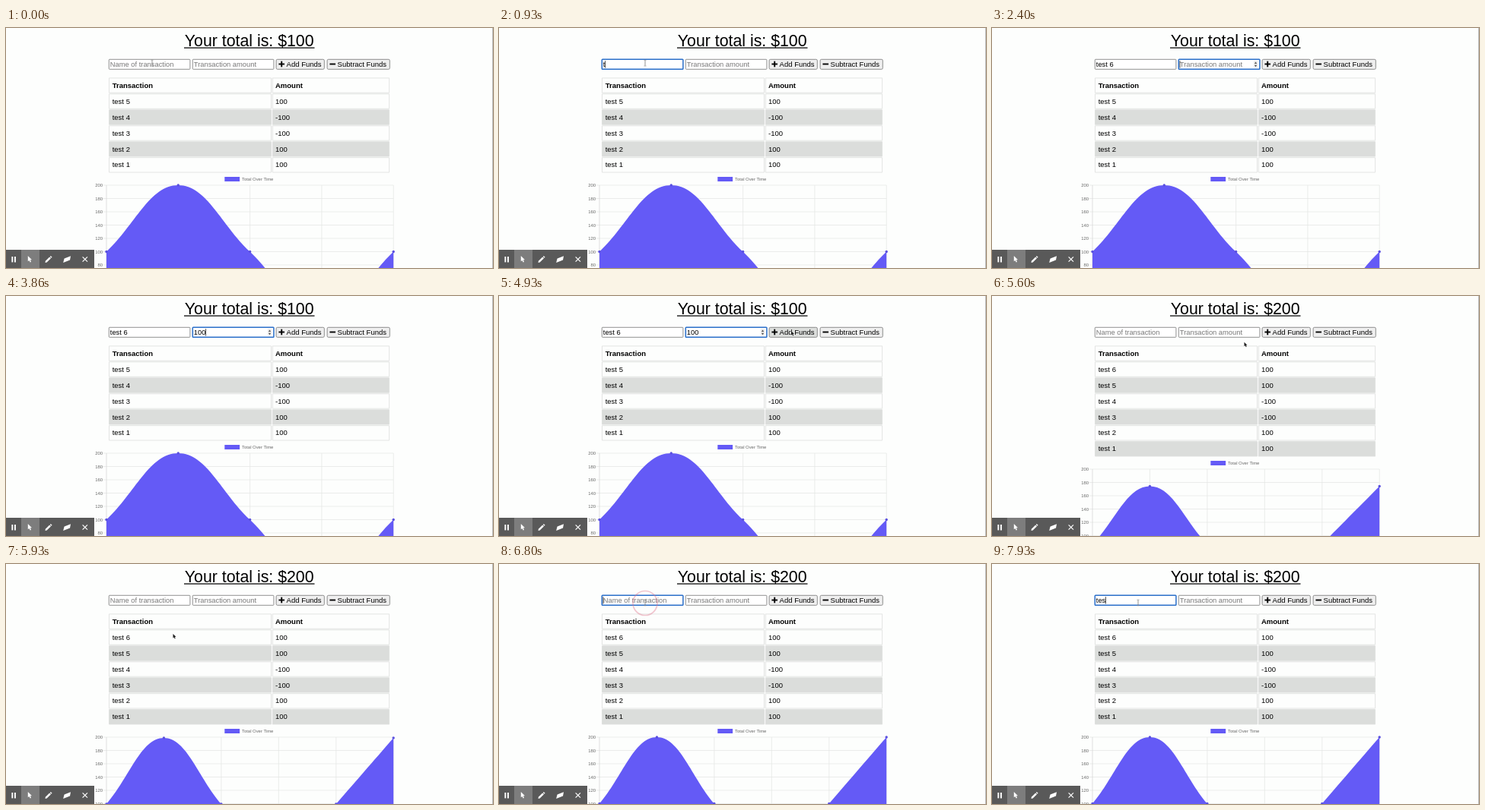
An HTML page with a canvas that plays this animation: 640x316 px, repeating every 8 s.

```html
<!DOCTYPE html>
<html lang="en">
<head>
<meta charset="utf-8">
<title>Budget tracker</title>
<style>
  html, body { margin: 0; width: 100%; height: 100%; overflow: hidden; background: #fdfefd; }
  canvas { display: block; width: 640px; height: 316px; }
</style>
</head>
<body>
<canvas id="stage"></canvas>
<script>
const LOOP = 8000;
const ADDED = 5200;
const CLEARED = 5330;
const FONT = '"Liberation Sans", Arial, sans-serif';
const PURPLE = '#645af6';

const canvas = document.getElementById('stage');
const dpr = window.devicePixelRatio || 1;
canvas.width = 640 * dpr;
canvas.height = 316 * dpr;
const ctx = canvas.getContext('2d');

const clamp = v => Math.max(0, Math.min(1, v));
const ease = p => p * p * (3 - 2 * p);

function text(str, x, y, size, color = '#000', align = 'left', weight = '') {
  ctx.font = `${weight} ${size}px ${FONT}`;
  ctx.fillStyle = color;
  ctx.textAlign = align;
  ctx.fillText(str, x, y);
}

function box(x, y, w, h, fill, stroke, line = 1, radius = 0) {
  ctx.beginPath();
  ctx.roundRect(x, y, w, h, radius);
  if (fill) { ctx.fillStyle = fill; ctx.fill(); }
  if (stroke) { ctx.strokeStyle = stroke; ctx.lineWidth = line; ctx.stroke(); }
}

function poly(points, fill) {
  ctx.beginPath();
  points.forEach(([x, y]) => ctx.lineTo(x, y));
  ctx.closePath();
  ctx.fillStyle = fill;
  ctx.fill();
}

function stroke(points, color, width) {
  ctx.beginPath();
  points.forEach(([x, y], i) => i ? ctx.lineTo(x, y) : ctx.moveTo(x, y));
  ctx.strokeStyle = color;
  ctx.lineWidth = width;
  ctx.stroke();
}

// Last entry whose start time has passed.
const latest = (list, t) => list.filter(e => e[0] <= t).pop();

// [time, text]
const nameKeys = [[0, ''], [900, 't'], [1000, 'te'], [1130, 'tes'], [1260, 'test'],
  [1400, 'test '], [1730, 'test 6'], [CLEARED, ''], [7730, 't'], [7800, 'te'], [7900, 'tes']];
const amountKeys = [[0, ''], [2930, '1'], [3200, '10'], [3400, '100'], [CLEARED, '']];
// [time, focused field]
const focusLog = [[0, ''], [470, 'name'], [2100, 'amount'], [5070, ''], [6500, 'name']];

// [time, x, y]
const mousePath = [[0, 192, 46], [3950, 192, 47], [4850, 384, 46], [5420, 384, 46],
  [5900, 219.5, 92], [5960, 219.5, 92], [6380, 192, 51], [LOOP, 192, 51]];
// [time, x, y]
const clicks = [[400, 192, 46], [5060, 383.5, 46], [6470, 192, 51.5]];

function mouseAt(t) {
  const i = mousePath.findIndex(p => p[0] > t);
  const a = mousePath[i - 1], b = mousePath[i];
  const p = ease((t - a[0]) / (b[0] - a[0]));
  return [a[1] + (b[1] - a[1]) * p, a[2] + (b[2] - a[2]) * p];
}

function field(t, id, x, keys, hint) {
  const focus = latest(focusLog, t);
  const focused = focus[1] === id;
  const [typedAt, value] = latest(keys, t);
  box(x + .5, 41.3, 106.6, 13, '#fff', focused ? '#2a6fc9' : '#858585', focused ? 1.5 : .9, .8);
  text(value || hint, x + 2, 51, 9.35, value ? '#000' : '#777');
  if (!focused) return;
  const since = t - Math.max(typedAt, focus[0]);
  if (since % 1000 < 500) {
    ctx.font = `9.35px ${FONT}`;
    const cx = x + 2.2 + ctx.measureText(value).width;
    stroke([[cx, 43.2], [cx, 52.5]], '#000', .7);
  }
  if (id === 'amount') {
    box(x + 99, 43, 5.5, 9.6, '#efefef', null, 0, 1);
    poly([[x + 100, 47], [x + 101.7, 44.6], [x + 103.4, 47]], '#555');
    poly([[x + 100, 48.8], [x + 101.7, 51.2], [x + 103.4, 48.8]], '#555');
  }
}

function button(x, w, label, plus, hot) {
  box(x + .5, 41.3, w, 13, hot ? '#dcdedc' : '#efefef', '#808080', .9, 1.6);
  const cx = x + 7.6;
  stroke([[cx - 3.8, 47.5], [cx + 3.8, 47.5]], '#000', 1.9);
  if (plus) stroke([[cx, 43.7], [cx, 51.3]], '#000', 1.9);
  text(label, x + 14, 51, 9.5);
}

function table(rows) {
  const line = (cells, i) => {
    const y = 65.9 + 20.95 * i;
    const fill = i && i % 2 === 0 ? '#dbdddb' : '#fdfefd';
    box(135.5, y, 213, 19.4, fill, '#dcdddc', .8);
    box(350.3, y, 153.3, 19.4, fill, '#dcdddc', .8);
    const weight = i ? '' : 'bold';
    text(cells[0], 139.7, y + 12.8, 9.5, '#000', 'left', weight);
    text(cells[1], 354, y + 12.8, 9.5, '#000', 'left', weight);
  };
  [['Transaction', 'Amount'], ...rows].forEach(line);
}

// Smooth line with tension .4; end points act as their own neighbours.
function spline(pts) {
  return pts.map((p, i) => {
    const a = pts[i - 1] || p, b = pts[i + 1] || p;
    const da = Math.hypot(p[0] - a[0], p[1] - a[1]);
    const db = Math.hypot(b[0] - p[0], b[1] - p[1]);
    const ka = .4 * da / (da + db), kb = .4 * db / (da + db);
    const dx = b[0] - a[0], dy = b[1] - a[1];
    return { p, before: [p[0] - ka * dx, p[1] - ka * dy], after: [p[0] + kb * dx, p[1] + kb * dy] };
  });
}

function chart(totals, top, grow) {
  const left = 132, right = 509.2, zero = top + 175;
  const step = (right - left) / (totals.length - 1);

  box(287.3, top - 11, 19.8, 6, PURPLE);
  text('Total Over Time', 310, top - 5.9, 5.9, '#666');

  for (let v = 200; v >= 60; v -= 20) {
    const y = zero - v * .875;
    stroke([[127, y], [right, y]], '#e4e5e4', .7);
    text(v, 127, y + 2.1, 5.9, '#666', 'right');
  }
  totals.forEach((_, i) => {
    const x = left + i * step;
    stroke([[x, top], [x, 316]], i ? '#e4e5e4' : '#d2d3d2', .7);
  });

  const nodes = spline(totals.map((v, i) => [left + i * step, zero - v * .875]));
  const at = ([x, y]) => [x, zero + (Math.min(zero, Math.max(top, y)) - zero) * grow];
  ctx.beginPath();
  ctx.moveTo(left, zero);
  ctx.lineTo(...at(nodes[0].p));
  for (let i = 1; i < nodes.length; i++) {
    ctx.bezierCurveTo(...at(nodes[i - 1].after), ...at(nodes[i].before), ...at(nodes[i].p));
  }
  ctx.lineTo(right, zero);
  ctx.fillStyle = PURPLE;
  ctx.fill();
  nodes.forEach(n => {
    const [x, y] = at(n.p);
    ctx.beginPath();
    ctx.arc(x, y, 1.7, 0, 7);
    ctx.fillStyle = '#5a50e0';
    ctx.fill();
  });
}

const arrow = (x, y, s, fill) => poly(
  [[0, 0], [0, 7], [1.6, 5.6], [2.8, 8.2], [4, 7.6], [2.9, 5.1], [5, 5]]
    .map(([a, b]) => [x + a * s, y + b * s]), fill);

function toolbar() {
  box(0, 292, 116, 24, '#595959');
  box(20, 292, 24, 24, '#7d7d7d');
  box(7.4, 301, 1.9, 7.4, '#fff');
  box(11, 301, 1.9, 7.4, '#fff');
  arrow(28.8, 300, 1.05, '#fff');
  poly([[51.5, 309], [51.9, 306.8], [57.2, 301.5], [59, 303.3], [53.7, 308.6]], '#fff');
  poly([[57.8, 300.9], [58.8, 300], [60.6, 301.8], [59.6, 302.7]], '#fff');
  poly([[75.2, 309], [76.6, 303.6], [85, 300.2], [84, 305.6]], '#fff');
  stroke([[100.6, 301.3], [107, 307.7]], '#fff', 1.2);
  stroke([[107, 301.3], [100.6, 307.7]], '#fff', 1.2);
}

function mouse(t) {
  const hidden = t > 1000 && t < 3950;
  const [x, y] = mouseAt(t);
  if (!hidden) {
    const overName = x < 242 && y < 55;
    const overAmount = x > 245 && x < 352 && y < 55;
    if (overName || overAmount) {
      stroke([[x, y - 3.4], [x, y + 3.4]], '#777', .8);
      stroke([[x - 1.5, y - 3.8], [x + 1.5, y - 3.8]], '#888', .7);
      stroke([[x - 1.5, y + 3.8], [x + 1.5, y + 3.8]], '#888', .7);
    } else {
      ctx.save();
      ctx.shadowColor = '#fff';
      ctx.shadowBlur = 2 * dpr;
      arrow(x, y, .8, '#222');
      ctx.restore();
    }
  }
  clicks.forEach(([start, cx, cy]) => {
    const age = t - start;
    if (age < 0 || age > 400) return;
    ctx.globalAlpha = 1 - clamp((age - 230) / 170);
    ctx.beginPath();
    ctx.arc(cx, cy, 6 + 10 * clamp(age / 130), 0, 7);
    ctx.strokeStyle = '#e0728a';
    ctx.lineWidth = 1.7;
    ctx.stroke();
    ctx.globalAlpha = 1;
  });
}

function draw(t) {
  ctx.setTransform(dpr, 0, 0, dpr, 0, 0);
  box(0, 0, 640, 316, '#fdfefd');
  const added = t >= ADDED;

  text(`Your total is: $${added ? 200 : 100}`, 319.7, 23.7, 21.3, '#000', 'center');
  box(234, 25.4, 171.5, 1.4, '#000');

  field(t, 'name', 134.8, nameKeys, 'Name of transaction');
  field(t, 'amount', 244.8, amountKeys, 'Transaction amount');
  const [mx, my] = mouseAt(t);
  button(354.6, 63.2, 'Add Funds', true, mx > 355 && mx < 418 && my < 55);
  button(421.6, 82.2, 'Subtract Funds', false, false);

  const amounts = [100, 100, -100, -100, 100];
  if (added) amounts.push(100);
  let sum = 0;
  const totals = amounts.map(a => sum += a);
  table(amounts.map((a, i) => [`test ${i + 1}`, a]).reverse());
  const left = 1 - clamp((t - ADDED) / 1000);
  chart(totals, added ? 228 : 207, added ? 1 - left ** 4 : 1);

  box(639, 0, 1, 316, '#b5b6b5');
  toolbar();
  mouse(t);
}

const start = performance.now();
function tick() {
  draw((performance.now() - start) % LOOP);
  requestAnimationFrame(tick);
}
tick();
</script>
</body>
</html>
```
